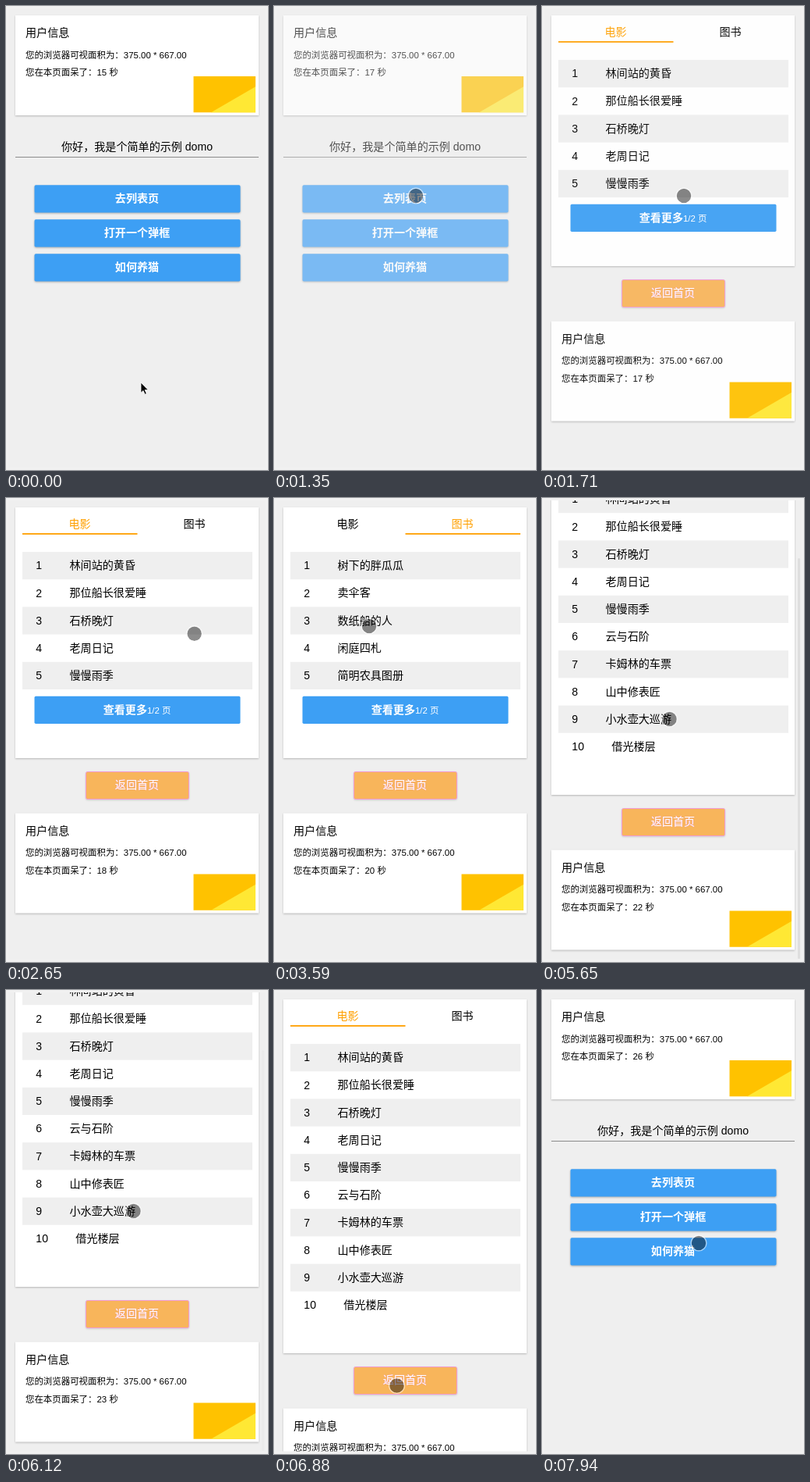
An HTML page for the animation above (8 s loop, 336 px wide and 594 px high).

```html
<!DOCTYPE html>
<html lang="zh-CN">
<head>
<meta charset="utf-8">
<style>
  html, body { margin: 0; width: 100%; height: 100%; overflow: hidden; background: #f1f1f1; }
  svg { display: block; width: 336px; height: 594px; }
  text { font: 14.08px "Liberation Sans", "Noto Sans CJK SC", "Noto Sans CJK", sans-serif; fill: #000; white-space: pre; }
  .small { font-size: 11.44px; }
  .mid { text-anchor: middle; }
  .bold { font-weight: bold; fill: #fff; }
  .card { fill: #fff; filter: drop-shadow(0 1px 1px rgba(0, 0, 0, .24)); }
  .btn { fill: #3d9ff4; }
  .raised { filter: drop-shadow(0 1px 1px rgba(0, 0, 0, .28)); }
  .back { fill: #f8b55b; stroke: #f29ad0; filter: drop-shadow(0 1px 1px rgba(0, 0, 0, .14)); }
</style>
</head>
<body>
<svg id="stage" viewBox="0 0 336 594"></svg>
<script>
const LOOP = 8000, ROW = 35.2, ORANGE = '#ffa000';
const movies = ['林间站的黄昏', '那位船长很爱睡', '石桥晚灯', '老周日记', '慢慢雨季',
  '云与石阶', '卡姆林的车票', '山中修表匠', '小水壶大巡游', '借光楼层'];
const books = ['树下的胖瓜瓜', '卖伞客', '数纸船的人', '闲庭四札', '简明农具图册'];

const text = (x, y, s, cls = '', extra = '') => `<text x="${x}" y="${y}" class="${cls}" ${extra}>${s}</text>`;
const rect = (x, y, w, h, cls = '', extra = '') =>
  `<rect x="${x}" y="${y}" width="${w}" height="${h}" class="${cls}" ${extra}/>`;
const button = (y, label) =>
  rect(36.5, y, 264, ROW, 'btn raised', 'rx="1.8"') + text(168, y + 22, label, 'bold mid');

const userCard = `
  ${rect(12, 12, 312, 128, 'card')}
  ${text(25, 39.4, '用户信息')}
  ${text(25, 66.5, '您的浏览器可视面积为：375.00 * 667.00', 'small')}
  ${text(25, 89, '', 'small timer')}
  <path d="M240.5 90h79.5v46.2h-79.5z" fill="#ffc200"/>
  <path d="M320 103.2v33h-57z" fill="#ffe834"/>`;

const rows = (names, id) => `<g id="${id}">` + names.map((name, i) => {
  const y = 69 + ROW * i, n = String(i + 1);
  return `<g>${i % 2 ? '' : rect(21, y, 295, ROW, '', 'fill="#efefef"')}
    ${text(38.3, y + 22.4, n)}${text(81.5 + 7.8 * (n.length - 1), y + 22.2, name)}</g>`;
}).join('') + '</g>';

stage.innerHTML = `
  <clipPath id="clip"><rect x="3" y="3" width="330" height="587.5"/></clipPath>
  <g clip-path="url(#clip)">
    ${rect(3, 3, 330, 588, '', 'fill="#efefef"')}
    <g id="home">
      ${userCard}
      ${text(168, 184.6, '你好，我是个简单的示例 domo', 'mid')}
      ${rect(12, 193, 312, 1, '', 'fill="#8c8c8c"')}
      ${['去列表页', '打开一个弹框', '如何养猫'].map((s, i) => button(229.3 + 44 * i, s)).join('')}
    </g>
    <g id="list">
      ${rect(12, 12, 312, 321, 'card', 'id="panel"')}
      ${text(94.5, 37.8, '电影', 'mid', 'id="tabA"')}
      ${text(241.5, 37.8, '图书', 'mid', 'id="tabB"')}
      ${rect(21, 45, 147.5, 1.8, '', `id="bar" fill="${ORANGE}"`)}
      ${rows(movies, 'movieRows')}${rows(books, 'bookRows')}
      <g id="more">
        ${rect(36.5, 253.8, 264, ROW, 'btn', 'rx="1.8"')}
        ${text(124.7, 275.8, '查看更多', 'bold')}
        ${text(181, 275.8, '1/2 页', 'small', 'style="fill:#fff;font-weight:500"')}
      </g>
      <g id="foot">
        ${rect(102.5, 350.5, 132, 35, 'back', 'rx="2"')}
        ${text(168, 372.4, '返回首页', 'bold mid', 'style="font-weight:500;text-shadow:0 0 1px violet"')}
        <g transform="translate(0 391.5)">${userCard}</g>
      </g>
    </g>
    ${rect(328, 3, 3, 513, '', 'id="thumb" rx="1.5" fill="#dedede"')}
  </g>
  <g id="touch">
    <circle r="9.3" fill="#000" fill-opacity=".45"/>
    <circle r="9.9" fill="none" stroke="#fff" stroke-opacity=".55" stroke-width="1.4"/>
  </g>
  <path id="arrow" d="M173 482v13.2l3-2.8 2.2 4.8 2.1-1-2.2-4.6h4.2z" fill="#000" stroke="#fff" stroke-width=".8"/>`;

const $ = id => document.getElementById(id);
const ramp = (t, a, b) => Math.min(1, Math.max(0, (t - a) / (b - a)));
const smooth = (t, a, b) => { const p = ramp(t, a, b); return p * p * (3 - 2 * p); };
const out = (t, a, b) => 1 - (1 - ramp(t, a, b)) ** 2;
const show = (id, on) => $(id).style.display = on ? '' : 'none';

// Each move: start time, end time, then the point reached.
const moves = [
  [350, 1000, 182, 243], [2120, 2800, 250, 164], [3240, 3550, 122, 164],
  [3820, 4260, 249, 164], [4420, 4800, 163.5, 283], [6540, 6860, 157.5, 506.5], [7710, 7930, 201, 324]
];

function touchAt(t) {
  let x = 173.5, y = 482.5;
  for (const [a, b, tx, ty] of moves) {
    const p = smooth(t, a, b);
    x += (tx - x) * p;
    y += (ty - y) * p;
  }
  return `translate(${x} ${y})`;
}

function draw(t) {
  const seconds = Math.floor(15.15 + t * .001375);
  document.querySelectorAll('.timer').forEach(e => e.textContent = `您在本页面呆了：${seconds} 秒`);

  $('home').style.opacity = 1 - out(t, 1310, 1530) + out(t, 7295, 7470);
  $('list').style.opacity = out(t, 1530, 1770) - out(t, 7120, 7295);

  const onBooks = t >= 3420 && t < 4130;
  const open = t >= 4880;
  const slide = smooth(t, 3400, 3570) - smooth(t, 4110, 4300);
  $('bar').setAttribute('x', 21 + 147.5 * slide);
  $('tabA').style.fill = onBooks ? '' : ORANGE;
  $('tabB').style.fill = onBooks ? ORANGE : '';
  show('movieRows', !onBooks);
  show('bookRows', onBooks);
  show('more', !open);
  [...$('movieRows').children].slice(5).forEach(e => e.style.display = open ? '' : 'none');
  $('panel').setAttribute('height', open ? 453 : 321);
  $('foot').setAttribute('transform', `translate(0 ${open ? 132 : 0})`);

  const scroll = out(t, 5440, 5645) - out(t, 6320, 6520);
  $('list').setAttribute('transform', `translate(0 ${-85 * scroll})`);
  $('thumb').setAttribute('y', 3 + 74 * scroll);
  $('thumb').style.opacity = ramp(t, 5460, 5480) - ramp(t, 5950, 6180)
    + ramp(t, 6340, 6360) - ramp(t, 6680, 6870);

  show('arrow', t < 60);
  show('touch', t >= 60);
  $('touch').setAttribute('transform', touchAt(t));
}

const start = performance.now();
function frame() {
  draw((performance.now() - start) % LOOP);
  requestAnimationFrame(frame);
}
frame();
</script>
</body>
</html>
```
